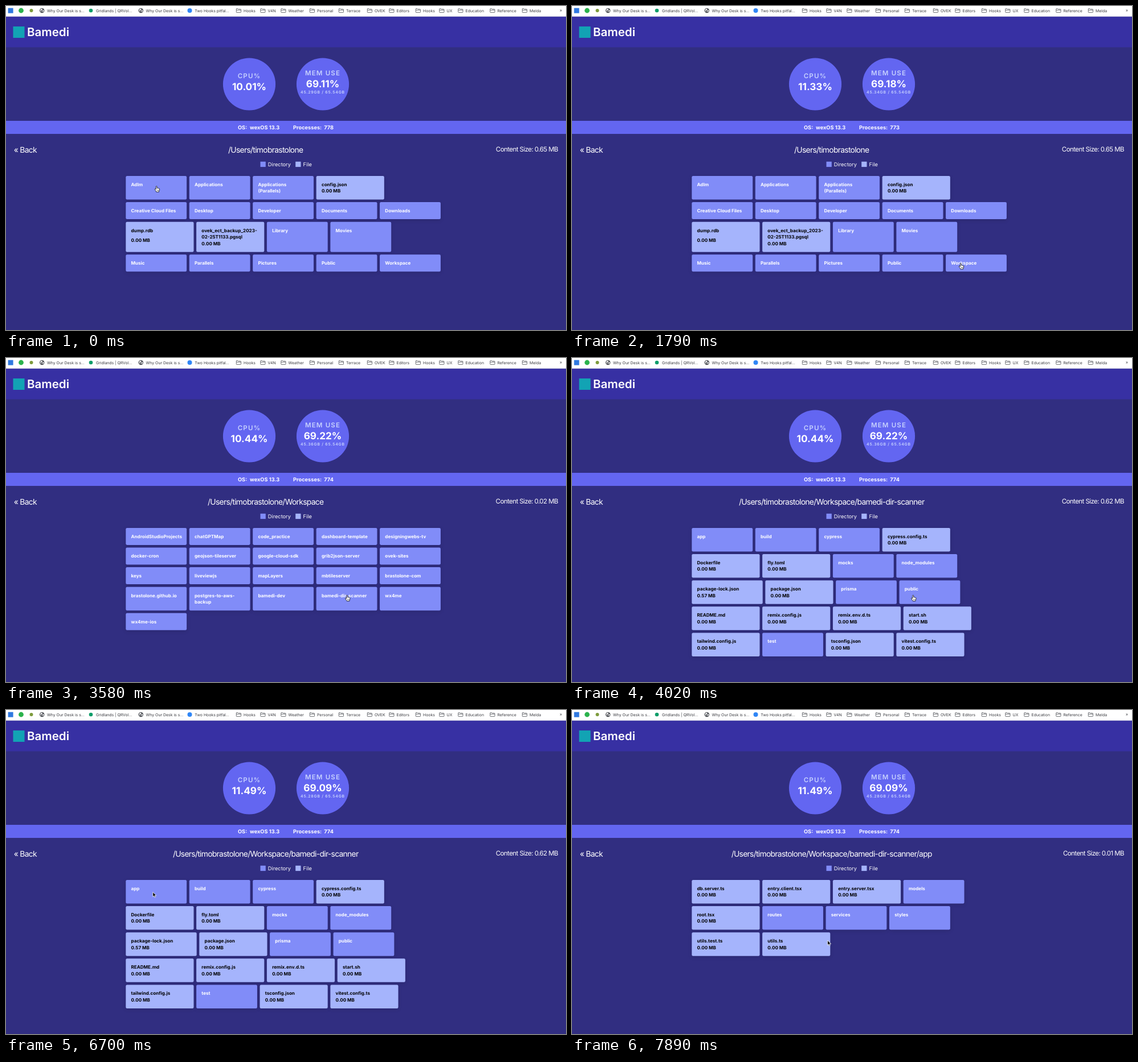
An HTML page that plays this animation: 983x570 px, repeating every 8000 ms.

```html
<!DOCTYPE html>
<html lang="en">
<head>
<meta charset="utf-8">
<title>Directory scanner</title>
<style>
  html, body { margin: 0; width: 100%; height: 100%; overflow: hidden; background: #312e81; }
  svg { display: block; }
  text { font-family: Inter, "Liberation Sans", sans-serif; fill: #fff; text-rendering: geometricPrecision; }
  .mark { font-size: 6.92px; fill: #3a3b40; }
  .brand { font-size: 20.5px; font-weight: 600; }
  .label { font-size: 11.54px; font-weight: 600; letter-spacing: .1em; fill: #c7d2fe; }
  .value { font-size: 17.2px; font-weight: 700; }
  .detail { font-size: 6.95px; font-weight: 600; letter-spacing: .11em; fill: #c7d2fe; }
  .info { font-size: 9.23px; font-weight: 700; }
  .head { font-size: 13.85px; letter-spacing: -.05em; }
  .size { font-size: 11.54px; letter-spacing: -.05em; }
  .legend { font-size: 9.23px; }
  .tile { font-size: 8.08px; font-weight: 700; }
  .file { fill: #000; }
  .mid { text-anchor: middle; }
  .end { text-anchor: end; }
  .tiles rect { filter: drop-shadow(0 2.5px 3px rgba(0, 0, 0, .12)); }
</style>
</head>
<body>
<svg id="stage" width="983" height="570" viewBox="0 0 983 570"></svg>
<script>
const LOOP = 8000;
const DIR = '#818cf8', FILE = '#a5b4fc', ACCENT = '#6366f1';
const LINE = 11.54, PAD = 9.23, GAP = 4.6;

// A leading * marks a file, | breaks a name, = gives a size.
const home = '/Users/timobrastolone';
const pages = [
  { at: 0, path: home, size: '0.65', rows: [
    'Adlm,Applications,Applications|(Parallels),*config.json',
    'Creative Cloud Files,Desktop,Developer,Documents,Downloads',
    '*dump.rdb,*ovek_ect_backup_2023-|02-25T1133.pgsql,Library,Movies',
    'Music,Parallels,Pictures,Public,Workspace'] },
  { at: 2080, path: home + '/Workspace', size: '0.02', rows: [
    'AndroidStudioProjects,chatGPTMap,code_practice,dashboard-template,designingwebs-tv',
    'docker-cron,geojson-tileserver,google-cloud-sdk,grib2json-server,ovek-sites',
    'keys,liveviewjs,mapLayers,mbtileserver,brastolone-com',
    'brastolone.github.io,postgres-to-aws-|backup,bamedi-dev,bamedi-dir-scanner,wx4me',
    'wx4me-ios'] },
  { at: 4020, path: home + '/Workspace/bamedi-dir-scanner', size: '0.62', rows: [
    'app,build,cypress,*cypress.config.ts',
    '*Dockerfile,*fly.toml,mocks,node_modules',
    '*package-lock.json=0.57,*package.json,prisma,public',
    '*README.md,*remix.config.js,*remix.env.d.ts,*start.sh',
    '*tailwind.config.js,test,*tsconfig.json,*vitest.config.ts'] },
  { at: 6850, path: home + '/Workspace/bamedi-dir-scanner/app', size: '0.01', rows: [
    '*db.server.ts,*entry.client.tsx,*entry.server.tsx,models',
    '*root.tsx,routes,services,styles',
    '*utils.test.ts,*utils.ts'] }
];

const stats = [
  { at: 0, cpu: '10.01', mem: '69.11', used: '45.29', procs: 778 },
  { at: 300, cpu: '11.33', mem: '69.18', used: '45.34', procs: 773 },
  { at: 2830, cpu: '10.44', mem: '69.22', used: '45.36', procs: 774 },
  { at: 5360, cpu: '11.49', mem: '69.09', used: '45.28', procs: 774 }
];

// Pointer poses: time, tip x, tip y, arrow instead of hand.
const poses = [
  [0, 264.3, 316.5], [150, 253, 321], [300, 262, 338], [450, 318, 368], [600, 400, 400],
  [750, 490, 426], [900, 572, 446], [1040, 625, 455], [1190, 641.3, 456.5],
  [1340, 657, 455], [1490, 671, 453], [1640, 680, 452.3], [1790, 682.5, 452.3],
  [2080, 681.8, 452.3, 1], [2830, 676, 449], [2980, 650, 436], [3130, 616, 420],
  [3280, 601, 414.5], [3580, 598.8, 417], [4620, 597, 398], [4770, 591, 352],
  [4920, 589, 329.5], [5220, 535, 328.5], [5360, 462.5, 327], [5950, 390, 325],
  [6100, 305, 323], [6250, 259, 321], [6700, 257.8, 320, 1],
  [7740, 345, 358, 1], [7890, 448.6, 405, 1]
].map(([at, x, y, arrow]) => ({ at, x, y, arrow }));

const text = (x, y, cls, str, id = '') =>
  `<text x="${x}" y="${y}" class="${cls}"${id && ` id="${id}"`}>${str}</text>`;
const rect = (x, y, w, h, fill, r = 0) =>
  `<rect x="${x}" y="${y}" width="${w}" height="${h}" fill="${fill}" rx="${r}"/>`;
const dot = (x, y, r, fill) => `<circle cx="${x}" cy="${y}" r="${r}" fill="${fill}"/>`;

function parseTile(spec) {
  const file = spec[0] === '*';
  const [name, size] = spec.replace('*', '').split('=');
  const lines = name.split('|');
  const width = file ? (size ? 124.4 : 119.2) : 106.85;
  return { file, lines, width, size: size || '0.00', count: lines.length + (file ? 1 : 0) };
}

function tileRows(rows) {
  let y = 298.9, out = '';
  for (const row of rows) {
    const tiles = row.split(',').map(parseTile);
    const inner = LINE * Math.max(...tiles.map(t => t.count));
    let x = 210.3;
    for (const t of tiles) {
      const cls = t.file ? 'tile file' : 'tile';
      const base = y + 17.9;
      out += rect(x, y, t.width, inner + 2 * PAD, t.file ? FILE : DIR, 2.3);
      t.lines.forEach((s, i) => out += text(x + PAD, base + i * LINE, cls, s));
      if (t.file) {
        const drop = Math.max(t.lines.length * LINE, inner / 2);
        out += text(x + PAD, base + drop, cls, t.size + ' MB');
      }
      x += t.width + GAP;
    }
    y += inner + 2 * PAD + GAP;
  }
  return out;
}

const globe = x => dot(x, 8, 4.2, '#4b4e54') +
  `<path d="M${x - 3} 6.6l2-1.8 2 .5-1 1.7-1.5.6.6 1.6-1 1.3zM${x + .6} 7.6l2.6-.4-.4 2.4-1.7 1.2z" fill="#fff"/>`;
const folder = x =>
  `<path transform="translate(${x} 4)" d="M.5 1.2q0-.7.7-.7h2l1 1.1h3.8q.7 0 .7.7v4.4q0 .7-.7.7h-6.8q-.7 0-.7-.7zM.5 3.2h8.2" fill="none" stroke="#55585e" stroke-width=".85"/>`;

function bookmarks() {
  const folders = [[417, 'Hooks'], [459.5, 'V4N'], [495.5, 'Weather'], [546, 'Personal'],
    [597, 'Terrace'], [647, 'OVEK'], [685.5, 'Editors'], [732, 'Hooks'], [773.5, 'UX'],
    [806.5, 'Education'], [862.5, 'Reference'], [919, 'Melda']];
  return rect(0, 0, 983, 18.6, '#fff') +
    rect(3.6, 3.6, 9, 9, '#2f78e0') + dot(26.5, 8, 4.4, '#2bb24c') + dot(44.5, 8, 3, '#7d9b3c') +
    globe(63.2) + text(72, 10.5, 'mark', 'Why Our Desk is s...') +
    dot(149, 8, 3.3, '#0f9d6a') + text(158, 10.5, 'mark', 'Gridlands | QRVol...') +
    globe(236.8) + text(245.5, 10.5, 'mark', 'Why Our Desk is s...') +
    dot(322.5, 8, 4, '#2f86f6') + text(331.3, 10.5, 'mark', 'Two Hooks pitfal...') +
    folders.map(([x, s]) => folder(x - 13.2) + text(x, 10.5, 'mark', s)).join('') +
    text(972, 10.3, 'mark', '»');
}

const stage = document.getElementById('stage');
stage.innerHTML =
  rect(0, 0, 983, 570, '#312e81') + rect(0, 18.6, 983, 54, '#3730a3') + bookmarks() +
  rect(12.5, 36, 20, 20, '#12a3b4') + text(37, 53, 'brand', 'Bamedi') +
  dot(427, 137.5, 46.1, ACCENT) + dot(556, 137.5, 46.1, ACCENT) +
  text(427, 127.2, 'label mid', 'CPU%') + text(427, 147.6, 'value mid', '', 'cpu') +
  text(556, 122.2, 'label mid', 'MEM USE') + text(556, 142.8, 'value mid', '', 'mem') +
  text(556, 154, 'detail mid', '', 'used') +
  rect(0, 202, 983, 23, ACCENT) +
  text(407, 217, 'info', 'OS:') + text(428, 217, 'info', 'wexOS 13.3') +
  text(504, 217, 'info', 'Processes:') + text(558.3, 217, 'info', '', 'procs') +
  text(13.8, 258, 'head', '« Back') + text(455.7, 258, 'head mid', '', 'path') +
  text(969, 256.1, 'size end', '', 'size') +
  rect(446.5, 273.8, 9.3, 9.3, DIR) + text(459.8, 281.9, 'legend', 'Directory') +
  rect(508.2, 273.8, 9.3, 9.3, FILE) + text(521.6, 281.9, 'legend', 'File') +
  pages.map((p, i) => `<g class="tiles" id="page${i}">${tileRows(p.rows)}</g>`).join('') +
  `<g id="pointer" stroke-linejoin="round">
    <path id="arrow" d="M0 .3V8.6L1.9 6.9 3.2 9.8 4.6 9.2 3.3 6.4H6z" fill="#000" stroke="#fff" stroke-width=".8"/>
    <g id="hand" stroke="#000" stroke-width=".75">
      <path d="M-1 1.2Q-1 .3-.1 .3T.9 1.2V4Q1.6 3.3 2.5 4.2 3.3 3.6 4 4.6 5.1 4.2 5.2 5.6 5.2 8 4.2 9.2V10.6H-.6Q-.8 9.4-1.8 8.2-2.9 6.7-3.2 5.8-3 4.7-1.9 5.3L-1 6.2z" fill="#fff"/>
      <path d="M.7 6.8v2M2.1 6.8v2M3.4 6.8v2" stroke-width=".5"/>
    </g>
  </g>`;

const el = id => document.getElementById(id);
const current = (list, t) => list.findLast(item => item.at <= t);
const put = (id, str) => { if (el(id).textContent !== str) el(id).textContent = str; };
const show = (id, on) => el(id).setAttribute('display', on ? 'inline' : 'none');

function draw(t) {
  const page = current(pages, t), stat = current(stats, t), pose = current(poses, t);
  pages.forEach((p, i) => show('page' + i, p === page));
  put('path', page.path);
  put('size', `Content Size: ${page.size} MB`);
  put('cpu', stat.cpu + '%');
  put('mem', stat.mem + '%');
  put('used', stat.used + 'GB / 65.54GB');
  put('procs', String(stat.procs));
  show('arrow', pose.arrow);
  show('hand', !pose.arrow);
  el('pointer').setAttribute('transform', `translate(${pose.x} ${pose.y})`);
}

function tick() {
  draw(performance.now() % LOOP);
  requestAnimationFrame(tick);
}
tick();
</script>
</body>
</html>
```
